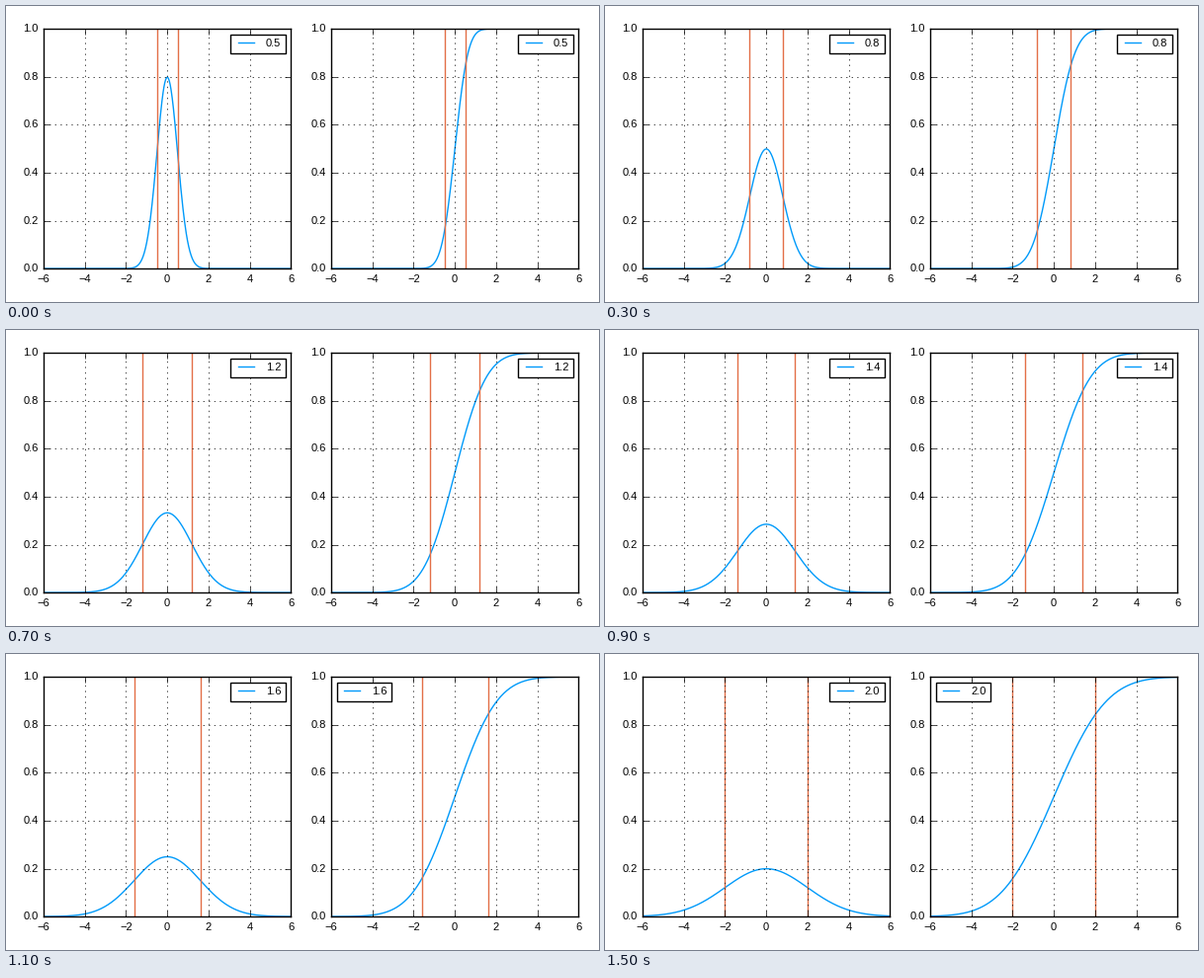
A matplotlib script for the animation above (1.6 s loop, 600x300 px).

```python
import math

import numpy as np
import matplotlib.pyplot as plt
from matplotlib.animation import FuncAnimation

WIDTH, HEIGHT, DPI = 600, 300, 100
FRAMES, INTERVAL = 16, 100
BLUE = (0.0, 0.6056, 0.9787)
ORANGE = (0.8889, 0.4356, 0.2781)

plt.rcParams.update({
    "font.family": "Liberation Sans",
    "font.size": 8,
    "text.hinting": "auto",
    "axes.linewidth": 1.0,
    "axes.axisbelow": False,
    "lines.linewidth": 1.0,
    "lines.solid_capstyle": "projecting",
    "lines.scale_dashes": False,
    "lines.dotted_pattern": [1, 3],
    "grid.color": "black",
    "grid.linestyle": ":",
    "grid.linewidth": 0.5,
    "xtick.direction": "in",
    "ytick.direction": "in",
    "xtick.top": True,
    "ytick.right": True,
    "xtick.major.size": 4,
    "ytick.major.size": 4,
    "xtick.major.width": 0.5,
    "ytick.major.width": 0.5,
    "xtick.major.pad": 4,
    "ytick.major.pad": 4,
    "ytick.alignment": "center",
    "legend.fancybox": False,
    "legend.framealpha": 1.0,
    "legend.edgecolor": "black",
    "legend.numpoints": 2,
    "patch.linewidth": 1.0,
})

x = np.linspace(-6, 6, 601)
erf = np.vectorize(math.erf)


def pdf(sigma):
    return np.exp(-0.5 * (x / sigma) ** 2) / (sigma * math.sqrt(2 * math.pi))


def cdf(sigma):
    return 0.5 * (1 + erf(x / (sigma * math.sqrt(2))))


class Panel:
    """One plot: a curve, two lines at plus and minus sigma, and a legend."""

    def __init__(self, fig, left, curve):
        top, bottom, width = 23.1, 266.1, 250.2
        self.curve = curve
        ax = fig.add_axes([left / WIDTH, 1 - bottom / HEIGHT,
                           width / WIDTH, (bottom - top) / HEIGHT])
        ax.set(xlim=(-6, 6), ylim=(0, 1),
               xticks=range(-6, 7, 2), yticks=np.linspace(0, 1, 6))
        ax.yaxis.set_major_formatter("{x:.1f}")
        ax.grid(True)
        self.line, = ax.plot(x, curve(0.5), color=BLUE, label="0.5")
        self.bounds = [ax.axvline(0, color=ORANGE) for _ in range(2)]
        self.legend = ax.legend(handles=[self.line], loc="upper right")

    def update(self, sigma):
        self.line.set_ydata(self.curve(sigma))
        for bound, pos in zip(self.bounds, (-sigma, sigma)):
            bound.set_xdata([pos, pos])
        self.legend.get_texts()[0].set_text(f"{sigma:.1f}")


fig = plt.figure(figsize=(WIDTH / DPI, HEIGHT / DPI), dpi=DPI, facecolor="white")
density = Panel(fig, 38.08, pdf)
cumulative = Panel(fig, 329.08, cdf)


def update(frame):
    sigma = 0.5 + 0.1 * frame
    density.update(sigma)
    cumulative.update(sigma)
    # The legend moves away once the curve would run through it.
    cumulative.legend.set_loc("upper left" if sigma > 1.55 else "upper right")
    return []


anim = FuncAnimation(fig, update, frames=FRAMES, interval=INTERVAL,
                     init_func=lambda: update(0), repeat=True, blit=False)
plt.show()
```
